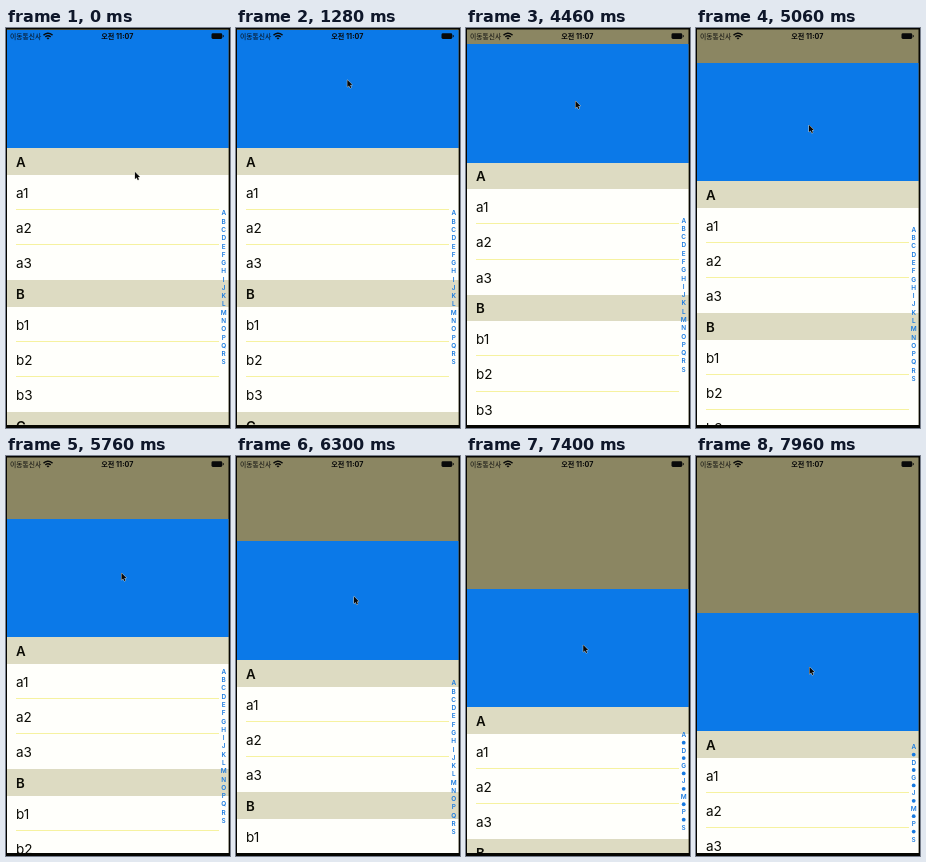
Write an HTML page with a canvas that moves like this. It is 224 px wide and 400 px high and loops after 8 s.

```html
<!DOCTYPE html>
<html lang="ko">
<head>
<meta charset="utf-8">
<style>
html, body { margin: 0; width: 100%; height: 100%; overflow: hidden; background: #060602; }
canvas { display: block; width: 224px; height: 400px; }
</style>
</head>
<body>
<canvas id="stage"></canvas>
<script>
const W = 224, H = 400, LOOP = 8000;
const TOP = 1.5, LEFT = 1, RIGHT = 222.5, BOTTOM = 397;
const LIST_Y = 120.3, HEAD_H = 26.4, ROW_H = 35.2;
const SANS = 'Inter, "Noto Sans CJK KR", "Noto Sans CJK", sans-serif';
const LETTERS = [...'ABCDEFGHIJKLMNOPQRS'];

const canvas = document.getElementById('stage');
const ctx = canvas.getContext('2d');
const dpr = window.devicePixelRatio || 1;
canvas.width = W * dpr;
canvas.height = H * dpr;
ctx.scale(dpr, dpr);

// Keys are [step, value]
const PULL = [[77, 0], [83, 3], [95, 14.5], [109, 33], [124, 61], [146, 107], [170, 155]];
const CURSOR_X = [[0, 129], [17, 117], [34, 110], [70, 109.5], [95, 109.5], [109, 113], [124, 115.5], [146, 119.5], [170, 113.5]];
const CURSOR_Y = [[0, 144], [4, 128], [12, 76], [17, 61], [26, 53], [34, 50], [77, 50], [95, 73], [109, 97], [124, 117], [146, 166], [170, 211]];

// Screen steps come in threes per 140 ms: short, long, short
function stepAt(t) {
  const r = t % 140;
  return 3 * Math.floor(t / 140) + (r < 20 ? 0 : r < 120 ? 1 : 2);
}

// Monotone cubic interpolation
function curve(keys, x) {
  const last = keys.length - 1;
  if (x <= keys[0][0]) return keys[0][1];
  if (x >= keys[last][0]) return keys[last][1];
  const slope = i => (keys[i + 1][1] - keys[i][1]) / (keys[i + 1][0] - keys[i][0]);
  const tangent = i => {
    if (i === 0 || i === last) return 0;
    const a = slope(i - 1), b = slope(i);
    return a * b <= 0 ? 0 : 2 * a * b / (a + b);
  };
  let i = 0;
  while (x > keys[i + 1][0]) i++;
  const [x0, y0] = keys[i], [x1, y1] = keys[i + 1];
  const m0 = tangent(i);
  const m1 = i + 1 === last ? slope(i) : tangent(i + 1);
  const d = x1 - x0, u = (x - x0) / d, v = 1 - u;
  return v * v * (1 + 2 * u) * y0 + u * v * v * d * m0 +
    u * u * (3 - 2 * u) * y1 - u * u * v * d * m1;
}

function rect(x, y, w, h, color) {
  ctx.fillStyle = color;
  ctx.fillRect(x, y, w, h);
}

// Full-width band whose edges sit on whole pixels
function band(top, bottom, color) {
  const y = Math.round(top);
  rect(0, y, W, Math.round(bottom) - y, color);
}

function text(s, x, y, font, color, align = 'left') {
  ctx.font = font + ' ' + SANS;
  ctx.fillStyle = color;
  ctx.textAlign = align;
  ctx.textBaseline = 'alphabetic';
  ctx.fillText(s, x, y);
}

function drawList(pull) {
  let y = LIST_Y + pull;
  for (const name of ['A', 'B', 'C']) {
    band(y, y + HEAD_H, '#dddbc2');
    text(name, 10, y + 18.6, '600 13.3px', '#0c0c06');
    y += HEAD_H;
    for (let i = 1; i <= 3; i++) {
      band(y, y + ROW_H, '#fffffb');
      text(name.toLowerCase() + i, 10, y + 23, '400 13.5px', '#0c0c06');
      y += ROW_H;
      if (i < 3) rect(10, Math.round(y) - 1, 203, 1, '#f6f2a0');
    }
  }
}

function drawIndex(pull) {
  const mid = 259.6 + pull / 2;
  const full = pull < 120;
  const items = full ? LETTERS : LETTERS.filter((c, i) => i % 3 === 0).flatMap((c, i) => i ? ['', c] : [c]);
  const gap = full ? 8.28 : 7.7;
  items.forEach((c, i) => {
    const y = mid + (i - (items.length - 1) / 2) * gap;
    if (c) {
      text(c, 217.7, y + 2.3, '600 6.4px', '#1679e0', 'center');
    } else {
      ctx.beginPath();
      ctx.arc(217.7, y, 1.9, 0, 7);
      ctx.fill();
    }
  });
}

function drawStatus() {
  const ink = '#08090a';
  text('이동통신사', 4, 10.6, '400 6.8px', ink);
  text('오전 11:07', 111.3, 10.7, '700 7.1px', ink, 'center');
  ctx.strokeStyle = ink;
  ctx.lineWidth = 1.5;
  for (const r of [3.5, 6]) {
    ctx.beginPath();
    ctx.arc(42, 11.2, r, -Math.PI * 0.77, -Math.PI * 0.23);
    ctx.stroke();
  }
  ctx.beginPath();
  ctx.moveTo(42, 11.6);
  ctx.arc(42, 11.6, 2, -Math.PI * 0.76, -Math.PI * 0.24);
  ctx.fill();
  ctx.beginPath();
  ctx.roundRect(205.5, 5.3, 10.8, 5.6, 1.4);
  ctx.fill();
  rect(216.8, 7.1, 0.9, 2, ink);
}

function drawCursor(x, y) {
  ctx.beginPath();
  ctx.moveTo(x, y);
  for (const [dx, dy] of [[0, 7], [1.6, 5.6], [2.8, 8.1], [3.9, 7.6], [2.8, 5.1], [4.9, 4.9]]) {
    ctx.lineTo(x + dx, y + dy);
  }
  ctx.closePath();
  ctx.lineWidth = 1;
  ctx.lineJoin = 'round';
  ctx.strokeStyle = '#c8c8c0';
  ctx.stroke();
  ctx.fillStyle = '#080808';
  ctx.fill();
}

function draw(t) {
  const n = stepAt(t);
  const pull = curve(PULL, n);
  rect(0, 0, W, H, '#060602');
  ctx.save();
  ctx.beginPath();
  ctx.rect(LEFT, TOP, RIGHT - LEFT, BOTTOM - TOP);
  ctx.clip();
  rect(0, 0, W, H, '#8b8662');
  band(TOP + pull, LIST_Y + pull, '#0b79e8');
  drawList(pull);
  drawIndex(pull);
  drawStatus();
  ctx.restore();
  drawCursor(curve(CURSOR_X, n), curve(CURSOR_Y, n));
}

const start = performance.now();
function tick() {
  draw((performance.now() - start) % LOOP);
  requestAnimationFrame(tick);
}
tick();
</script>
</body>
</html>
```
